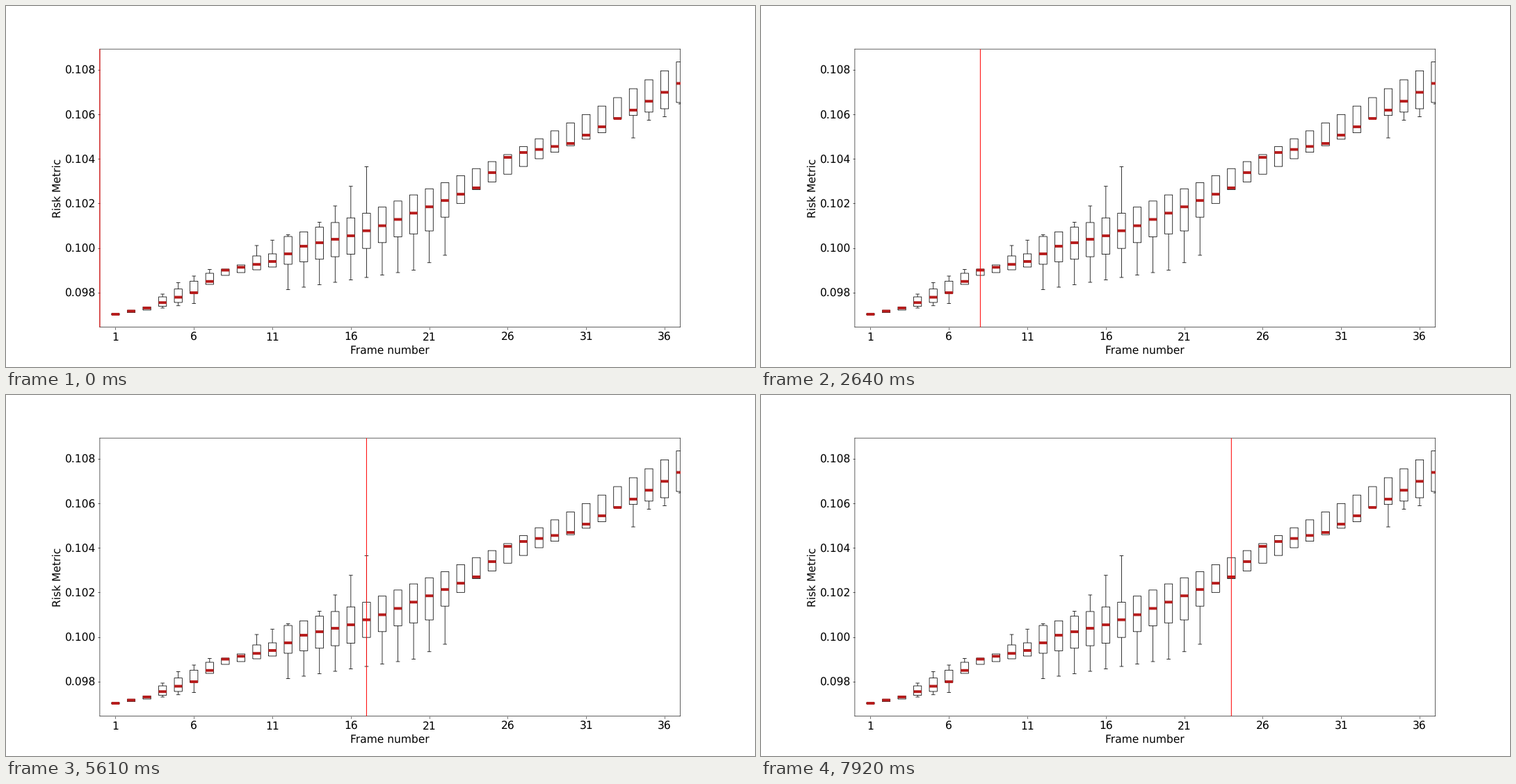
These frames come from a looping animation (1077x520 px, 8 s). A matplotlib script:

```python
import numpy as np
import matplotlib.pyplot as plt
from matplotlib.animation import FuncAnimation
from matplotlib.collections import LineCollection

WIDTH, HEIGHT = 1077, 520
DPI = WIDTH / 19.2
LOOP_MS, TICK_MS, STEP_MS = 8000, 40, 330
COUNT = 37
LEFT, RIGHT, TOP, BOTTOM = 134.9, 969.6, 62.1, 462.5

# Key points of each curve: box number and height in pixels from the top.
MEDIAN = [(1, 444), (3, 435), (5, 419.5), (6, 413), (8, 380.5), (11, 368),
          (13, 346), (16, 331), (18, 316.5), (24, 262), (26, 218), (27, 211),
          (30, 198), (34, 150), (37, 111.5)]
LOWER = [(1, 445), (3, 438), (5, 427), (8, 388), (12, 372), (16, 357.5),
         (19, 332.5), (21, 324), (24, 264.5), (28, 220), (32, 182.5),
         (33, 162.5), (36, 148), (37, 139)]
UPPER = [(1, 443), (3, 433.5), (4, 419), (7, 385), (9, 373), (10, 360),
         (11, 357), (12, 332), (17, 298.5), (22, 254.5), (26, 214),
         (30, 168.5), (33, 132), (37, 80.5)]
LOW_TIP = [(4, 435), (6, 428.5), (12, 408.5), (20, 380.5), (22, 359),
           (34, 190), (35, 164.5), (36, 159.5), (37, 141)]
HIGH_TIP = [(4, 415), (5, 398.5), (7, 379.5), (10, 345), (12, 329.5),
            (14, 311.5), (15, 288), (17, 231.5)]


def risk(level):
    """Convert a stage height to a value on the risk axis."""
    return 0.098 + (412.7 - level) / 32060


def curve(points, x):
    return risk(np.interp(x, *zip(*points)))


def draw_boxes(ax):
    x = np.arange(1, COUNT + 1)
    low, high = curve(LOWER, x), curve(UPPER, x)
    thin = dict(colors="black", linewidths=1, snap=False)

    outlines = [[(k - .25, a), (k + .25, a), (k + .25, b), (k - .25, b),
                 (k - .25, a)] for k, a, b in zip(x, low, high)]
    ax.add_collection(LineCollection(outlines, **thin))

    low_at = np.r_[4:7, 12:23, 34:38]
    high_at = np.r_[4:8, 10:13, 14:18]
    for pos, edge, points in ((low_at, low, LOW_TIP),
                              (high_at, high, HIGH_TIP)):
        tip = curve(points, pos)
        ax.vlines(pos, edge[pos - 1], tip, **thin)
        ax.hlines(tip, pos - .125, pos + .125, **thin)

    ax.hlines(curve(MEDIAN, x), x - .25, x + .25, colors="#b71c1c",
              linewidths=5, snap=False, zorder=3)


plt.rcParams.update({"font.family": "DejaVu Sans", "font.size": 20,
                     "text.hinting": "none"})
fig = plt.figure(figsize=(WIDTH / DPI, HEIGHT / DPI), dpi=DPI)
ax = fig.add_axes([LEFT / WIDTH, 1 - BOTTOM / HEIGHT,
                   (RIGHT - LEFT) / WIDTH, (BOTTOM - TOP) / HEIGHT])

draw_boxes(ax)
ax.set_xlim(0, COUNT)
ax.set_ylim(risk(BOTTOM), risk(TOP))
ax.set_xticks(range(1, COUNT, 5))
ax.set_yticks(np.arange(98, 109, 2) / 1000)
ax.yaxis.set_major_formatter("{x:.3f}")
ax.tick_params(axis="x", pad=5.8)
ax.set_xlabel("Frame number")
ax.set_ylabel("Risk Metric")
for spine in ax.spines.values():
    spine.set_snap(False)

cursor = ax.axvline(0, color="red", lw=1.3, zorder=5, clip_on=False,
                    solid_capstyle="butt", snap=False)


def update(i):
    # A step that falls inside this tick already counts.
    step = (i * TICK_MS + TICK_MS - 10) // STEP_MS
    cursor.set_xdata([step, step])
    return [cursor]


anim = FuncAnimation(fig, update, frames=LOOP_MS // TICK_MS,
                     interval=TICK_MS, repeat=True, repeat_delay=0)
plt.show()
```
